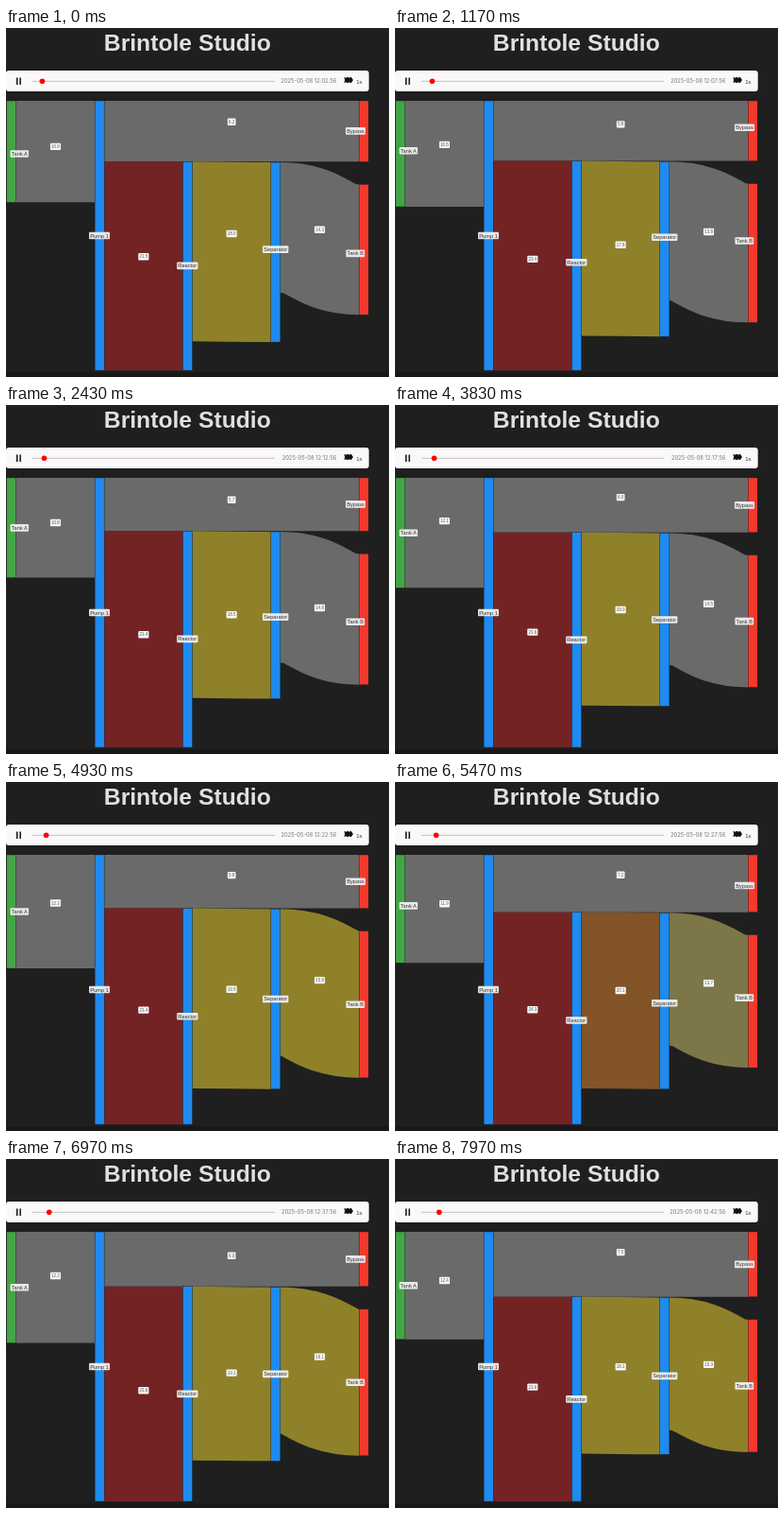
Write an HTML page that moves like this. It is 406 px wide and 369 px high and loops after 8 s.

```html
<!DOCTYPE html>
<html lang="en">
<head>
<meta charset="utf-8">
<title>Brintole Studio</title>
<style>
  html, body { margin: 0; width: 100%; height: 100%; overflow: hidden; background: #1f1f1f; }
  svg { display: block; width: 100vw; height: 100vh; }
  text { font-family: "Liberation Sans", Arial, sans-serif; text-anchor: middle; }
  .title { font-size: 24.7px; font-weight: bold; fill: #e0e0e0; }
  .clock { font: 5.8px Inter, sans-serif; text-anchor: end; fill: #777; }
  .node { stroke: #222; stroke-width: .4; }
  .name rect { fill: #f2f2f2; fill-opacity: .93; }
  .name text { font-size: 5.7px; fill: #333; }
  .value rect { fill: #f8f8f8; }
  .value text { font-size: 4.5px; fill: #555; }
</style>
</head>
<body>
<svg id="stage" viewBox="0 0 406 369">
  <rect width="406" height="369" fill="#1f1f1f"/>
  <rect y="364" width="406" height="5" fill="#1a1718"/>
  <text class="title" x="192.3" y="24">Brintole Studio</text>
  <rect x="0" y="45" width="384.7" height="22" rx="3" fill="#fbf8fa"/>
  <path d="M11 52.5h1.5v7.5h-1.5zM14.4 52.5h1.5v7.5h-1.5z" fill="#111"/>
  <path d="M28 56.3H285" stroke="#c4c0c2" stroke-width="1"/>
  <circle id="playhead" cy="56.3" r="2.8" fill="#f00"/>
  <text class="clock" id="clock" x="350.3" y="58.3"></text>
  <path d="M358.3 51.8l2 1 2-1 1.5 1 2-1 2.2 3.2-2.2 3.2-2-1-1.5 1-2-1-2 1 1-3.2z" fill="#111"/>
  <text x="374.3" y="58.6" font-size="6" fill="#333">1x</text>
</svg>
<script>
const LOOP = 8000, STEP = 1000, CLOCK_LEAD = 50, GRAPH_LEAD = 20;
const TOP = 77, HEIGHT = 285, LEFT = .8, COLUMN = 93.35, NODE_WIDTH = 10, TANK_GAP = 24;
const BLUE = '#1f8bf0', RED = '#f4392c', GREEN = '#43a546';
const GREY_LINK = [106, 106, 106], OLIVE_LINK = [143, 129, 41], RED_LINK = [116, 35, 36];

// Flow readings per step: tank A, bypass, reactor, separator, tank B.
// The first two precede the loop and are still easing out at its start.
const readings = [
  [11.3, 6.0, 22.9, 17.9, 14.6],
  [10.5, 6.3, 21.6, 18.6, 13.5],
  [10.9, 6.2, 21.5, 18.0, 14.3],
  [10.8, 5.8, 23.4, 17.8, 13.8],
  [10.8, 5.7, 23.4, 18.5, 14.8],
  [12.1, 6.0, 23.6, 19.0, 14.5],
  [12.3, 5.8, 23.4, 19.5, 15.9],
  [11.9, 7.2, 24.3, 20.1, 13.7],
  [12.2, 6.0, 23.6, 19.1, 16.1],
  [12.4, 7.5, 23.6, 18.1, 15.3],
];

const nodes = [
  { name: 'Tank A', column: 0, labelX: 14.3, color: GREEN },
  { name: 'Pump 1', column: 1, labelX: 99, color: BLUE },
  { name: 'Bypass', column: 4, labelX: 370.5, color: RED },
  { name: 'Reactor', column: 2, labelX: 192.3, color: BLUE },
  { name: 'Separator', column: 3, labelX: 285.7, color: BLUE },
  { name: 'Tank B', column: 4, labelX: 370.3, color: RED },
];
const links = [[0, 1], [1, 2], [1, 3], [3, 4], [4, 5]];
const nodeX = node => LEFT + COLUMN * node.column;

const stage = document.getElementById('stage');
const clock = document.getElementById('clock');
const playhead = document.getElementById('playhead');

function add(tag, attrs = {}, parent = stage) {
  const el = document.createElementNS('http://www.w3.org/2000/svg', tag);
  set(el, attrs);
  return parent.appendChild(el);
}

function set(el, attrs) {
  for (const key in attrs) el.setAttribute(key, attrs[key]);
}

function addTag(cls, height) {
  const group = add('g', { class: cls });
  const box = add('rect', { y: -height / 2, height, rx: 1 }, group);
  const text = add('text', { y: cls === 'name' ? 2 : 1.6 }, group);
  return { group, box, text };
}

function placeTag(tag, content, x, y) {
  if (tag.text.textContent !== content) {
    tag.text.textContent = content;
    const width = tag.text.getComputedTextLength() + 2.4;
    set(tag.box, { x: -width / 2, width });
  }
  set(tag.group, { transform: `translate(${x} ${y})` });
}

function linkColor(value) {
  return value > 20 ? RED_LINK : value > 15 ? OLIVE_LINK : GREY_LINK;
}

function layout(values) {
  const [a, bypass, reactor, separator, b] = values.map(v => v * HEIGHT / (values[1] + values[2]));
  const split = TOP + bypass;
  const tops = [TOP, TOP, TOP, split, split + .7, split + TANK_GAP];
  const heights = [a, HEIGHT, bypass, reactor, separator, b];
  const widths = [a, bypass, reactor, separator, b];
  const starts = [TOP, TOP, split, split, split + .7];
  const ends = [TOP, TOP, split, split + .7, split + TANK_GAP];
  return {
    nodes: tops.map((y, i) => [y, heights[i]]),
    links: widths.map((w, i) => [starts[i] + w / 2, ends[i] + w / 2, w]),
    colors: values.map(linkColor),
    labels: widths.map((w, i) => (starts[i] + ends[i] + w) / 2 - 7.3),
  };
}

const layouts = readings.map(layout);
const linkEls = links.map(() => add('path', { fill: 'none' }));
const nodeEls = nodes.map(n => add('rect', { class: 'node', x: nodeX(n), width: NODE_WIDTH, fill: n.color }));
const valueTags = links.map(() => addTag('value', 7.4));
const nameTags = nodes.map(() => addTag('name', 7.6));

const mix = (a, b, p) => Array.isArray(a) ? a.map((v, i) => mix(v, b[i], p)) : a + (b - a) * p;
const easeCubicInOut = p => p < .5 ? 4 * p ** 3 : 1 - 4 * (1 - p) ** 3;

function draw(t) {
  const minute = Math.floor((t + CLOCK_LEAD) / STEP);
  clock.textContent = `2025-05-08 12:${String(2 + 5 * minute).padStart(2, '0')}:56`;
  set(playhead, { cx: 38.4 + 1.05 * minute });

  const step = Math.min(Math.floor((t + GRAPH_LEAD) / STEP), 7);
  const p = easeCubicInOut(Math.min((t + GRAPH_LEAD) / STEP - step, 1));
  const [older, from, to] = layouts.slice(step, step + 3);
  const values = readings[step + 2];

  links.forEach(([source, target], i) => {
    const [y0, y1, width] = mix(from.links[i], to.links[i], p);
    const x0 = nodeX(nodes[source]) + NODE_WIDTH, x1 = nodeX(nodes[target]), mid = (x0 + x1) / 2;
    set(linkEls[i], {
      d: `M${x0} ${y0}C${mid} ${y0} ${mid} ${y1} ${x1} ${y1}`,
      'stroke-width': width,
      stroke: `rgb(${mix(from.colors[i], to.colors[i], p).map(Math.round)})`,
    });
    // Value tags trail the ribbons by one step.
    placeTag(valueTags[i], values[i].toFixed(1), mid, mix(older.labels[i], from.labels[i], p));
  });

  nodes.forEach((node, i) => {
    const [y, height] = mix(from.nodes[i], to.nodes[i], p);
    set(nodeEls[i], { y, height });
    const [finalY, finalHeight] = to.nodes[i];
    placeTag(nameTags[i], node.name, node.labelX, finalY + finalHeight / 2);
  });
}

const start = performance.now();
function frame() {
  draw((performance.now() - start) % LOOP);
  requestAnimationFrame(frame);
}
frame();
</script>
</body>
</html>
```
